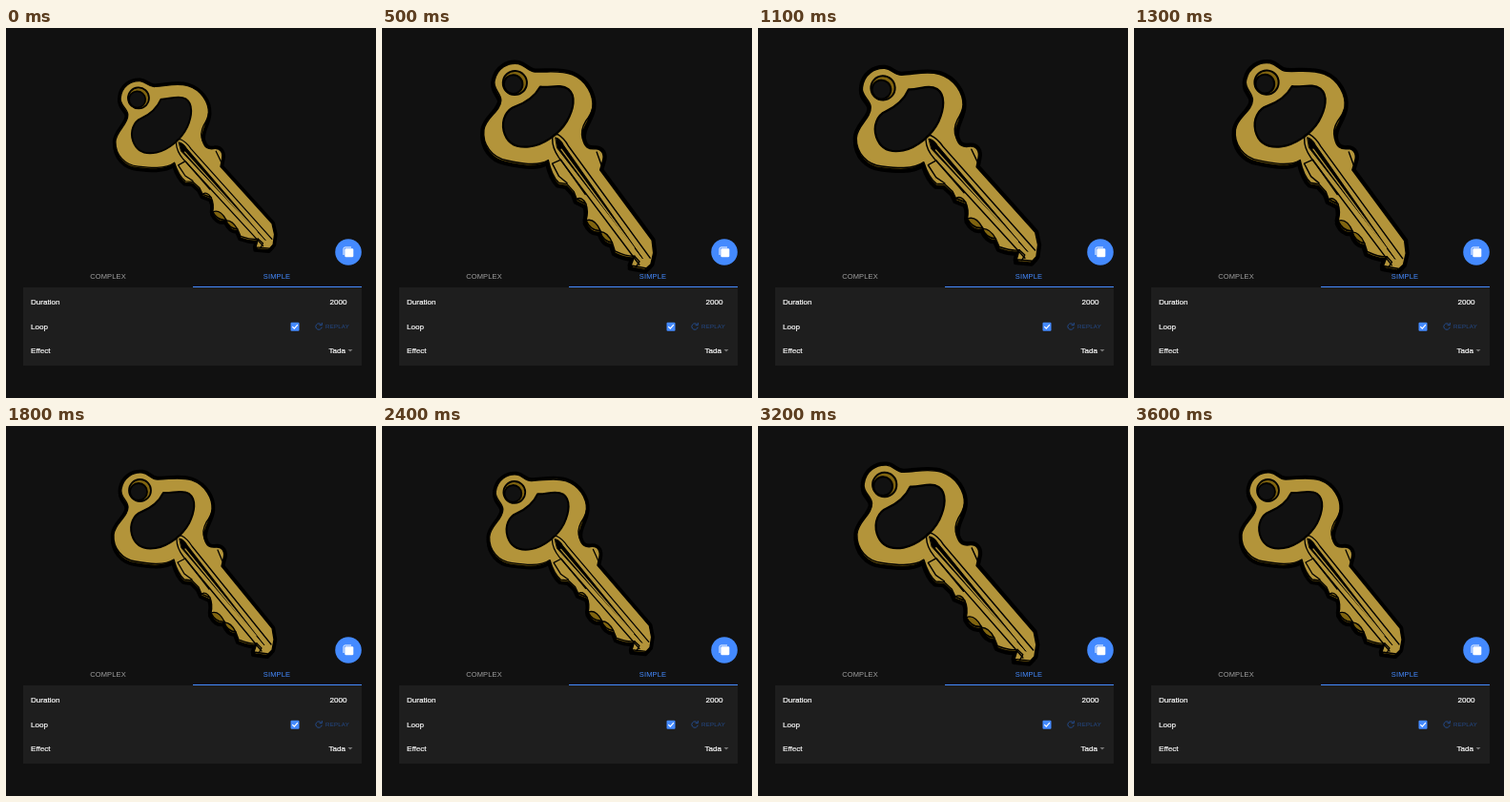
An HTML page for the animation above (3.9 s loop, 388 px wide and 388 px high).

```html
<!DOCTYPE html>
<html lang="en">
<head>
<meta charset="utf-8">
<title>Tada key</title>
<style>
  html, body { margin: 0; height: 100%; overflow: hidden; background: #111; }
  svg { display: block; width: 100vw; height: 100vh; }
  text { font: 8.1px "Liberation Sans", Arial, sans-serif; fill: #fff; }
  .row { stroke: #fff; stroke-width: .2; }
  .tab { font-size: 7.5px; letter-spacing: .15px; text-anchor: middle; }
  .end { text-anchor: end; }
  #key { stroke: #000; stroke-linejoin: round; stroke-linecap: round; }
</style>
</head>
<body>
<svg viewBox="0 0 388 388">
  <defs>
    <path id="body" d="M121 66C123 54 133 48 143 49C150 50 152 56 159 56C172 56 183 53 195 57
      C209 62 217 76 216 88C215 100 206 107 208 118C210 126 214 128 221 127C227 127 230 132 228 139
      L226 147L279 212L281 224L279 235L275 239L260 237L263 228C255 229 249 226 244 224L241 216
      C236 216 232 213 229 205C223 206 218 202 215 196Q217 187 214 180L205 176L202 169L195 162L187 161
      Q180 155 176 140C166 147 148 144 136 142C122 140 112 128 113 114C114 102 128 96 128 85
      C128 78 119 74 121 66Z"/>
    <path id="bow" d="M165 70C174 71 184 66 192 71C200 77 198 90 192 102C185 115 170 126 157 128
      C143 130 135 124 132 114C129 103 134 93 142 90C152 86 160 80 165 70Z"/>
  </defs>
  <g id="key" fill="none" stroke-width="1.3">
    <use href="#body" stroke-width="6.500"/>
    <use href="#body" x="-1" y="3" fill="#80640f" stroke-width="4"/>
    <use href="#body" fill="#b3943a"/>
    <path fill="#80640f" d="M216 88C215 100 206 107 208 118Q205 110 210 101Q215 94 216 88Z"/>
    <use href="#bow" fill="#111" stroke-width="2"/>
    <circle cx="140.500" cy="67.500" r="11.500" fill="#80640f" stroke-width="1.800"/>
    <circle cx="139" cy="69" r="9" fill="#111" stroke-width="1.800"/>
    <path d="M268 236L186 137Q179 128 179 119Q179 114 184 115Q190 118 195 126L278 229"/>
    <path fill="#000" stroke-width=".8" d="M182 118Q187 119 190 125L271 230L184 128Z"/>
    <path stroke="#b3943a" stroke-width="1.200" d="M188 129L262 220"/>
    <path d="M188 139L180 143L187 155L195 161M188 139L213 171M263 228L268 233L265 238M222 130L227 142"/>
    <path fill="#80640f" d="M205 176Q210 173 214 180ZM215 196Q223 193 229 205Q220 206 215 196ZM229 206Q236 206 241 216Q232 215 229 206Z"/>
  </g>

  <rect x="18" y="272" width="355" height="82" fill="#1e1e1e"/>
  <rect x="196" y="271" width="177" height="1" fill="#448aff"/>
  <text class="tab" x="107" y="262.800" style="fill:#a0a0a0">COMPLEX</text>
  <text class="tab" x="284" y="262.800" style="fill:#448aff">SIMPLE</text>

  <text class="row" x="26" y="290.300">Duration</text>
  <text class="row" x="26" y="315.500">Loop</text>
  <text class="row" x="26" y="340.600">Effect</text>
  <text class="row end" x="357.500" y="290.300">2000</text>
  <text class="row end" x="356" y="340.600">Tada</text>
  <path d="M358.500 337h5l-2.500 2.500z" fill="#777"/>

  <rect x="298.500" y="308.700" width="9" height="9" rx="1" fill="#448aff"/>
  <path d="M300.300 313.200l2 2l3.600-4" fill="none" stroke="#fff" stroke-width="1.200"/>
  <path d="M330.500 311a3.200 3.200 0 1 0 .7 2.700M331.300 309v2.700h-2.700" fill="none" stroke="#244b8c"/>
  <text x="335" y="315.200" style="font-size:6px;letter-spacing:.3px;fill:#244b8c">REPLAY</text>

  <circle cx="359" cy="235" r="13.800" fill="#448aff"/>
  <path d="M354 238v-6.500q0-1.500 1.500-1.500h6.500" fill="none" stroke="#fff"/>
  <rect x="355.300" y="231.300" width="9" height="9" rx="1.300" fill="#fff"/>
</svg>
<script>
  const LOOP = 3900, CYCLE = 2000, STEP = 100;
  const SEGMENT = 200, LEAD = 70;
  // scale and angle at each end of a segment
  const squeeze = [.96, -3], right = [1.1, 3], left = [1.1, -3], rest = [1, 0];
  const poses = [squeeze, squeeze, squeeze, right, left, right, left, right, rest];
  const key = document.getElementById("key");

  const easeInOut = p => p < .5 ? 2 * p * p : 1 - 2 * (1 - p) ** 2;

  function poseAt(time) {
    const at = (time % CYCLE + LEAD) / SEGMENT;
    const i = Math.floor(at);
    if (i >= poses.length - 1) return rest;
    const p = easeInOut(at - i);
    return poses[i].map((v, n) => v + (poses[i + 1][n] - v) * p);
  }

  function draw(now) {
    const time = Math.floor(now % LOOP / STEP) * STEP;
    const [scale, angle] = poseAt(time);
    key.setAttribute("transform", `translate(196 144) rotate(${angle}) scale(${scale}) translate(-196 -144)`);
    requestAnimationFrame(draw);
  }
  draw(performance.now());
</script>
</body>
</html>
```
